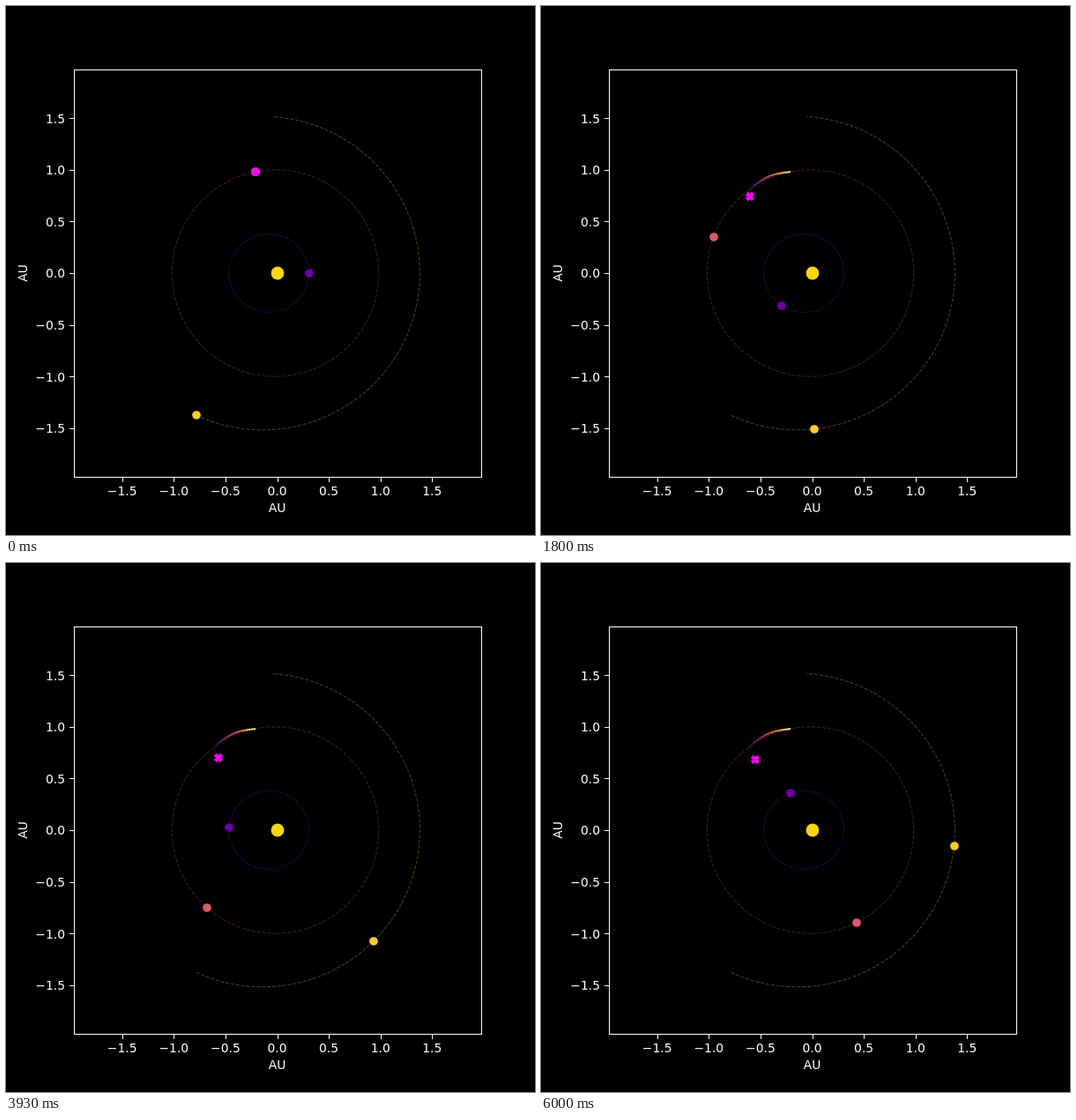
Animation, 600 px wide and 600 px high, one loop 6030 ms. Source, as an HTML page with a canvas:

```html
<!DOCTYPE html>
<html>
<head>
<meta charset="utf-8">
<style>
html, body { margin: 0; width: 100%; height: 100%; background: #000; overflow: hidden; }
canvas { display: block; }
</style>
</head>
<body>
<canvas id="stage" width="600" height="600"></canvas>
<script>
const ctx = document.getElementById('stage').getContext('2d');
const CX = 307.5, CY = 303, AU = 117.2, TAU = Math.PI * 2;
const STEP = 30, DAYS = 201;

// a in AU, period in days, m0 = mean anomaly in degrees on day 0
const planets = [
  { a: 0.3871, e: 0.2056, period: 87.97, m0: 0, color: '#6a00a8' },
  { a: 1, e: 0.0167, period: 365.25, m0: 100.1, color: '#da5a6a' },
  { a: 1.5237, e: 0.0934, period: 686.98, m0: 250, color: '#fcce25' }
];

// Probe path: distance travelled, x, y
const path = [
  [0, 283, 188], [18.3, 265, 191], [31.3, 253, 196], [47.8, 239.5, 205.5], [54, 236.6, 211],
  [58.9, 237.2, 216], [63.2, 240, 219.5], [64.8, 241.5, 220.8], [65.8, 242.3, 222.3], [67, 243.3, 223.5]
];
const heat = [[0, 0, 4], [62, 12, 108], [144, 40, 116], [222, 77, 81], [253, 162, 60], [252, 252, 175]];

function planetAt(p, day) {
  const m = p.m0 * TAU / 360 + TAU * day / p.period;
  let E = m;
  for (let i = 0; i < 6; i++) E -= (E - p.e * Math.sin(E) - m) / (1 - p.e * Math.cos(E));
  const x = p.a * (Math.cos(E) - p.e);
  const y = p.a * Math.sqrt(1 - p.e * p.e) * Math.sin(E);
  return [CX + x * AU, CY - y * AU];
}

const travelled = day => 61 * (1 - Math.exp(-day / 22)) + 0.03 * day;

function probeAt(day) {
  const s = Math.min(travelled(day), 67);
  let i = 0;
  while (i < path.length - 2 && s > path[i + 1][0]) i++;
  const p = path[i], q = path[i + 1], len = q[0] - p[0], u = (s - p[0]) / len;
  const slope = (j, k) => {
    const b = path[Math.max(j - 1, 0)], c = path[Math.min(j + 1, path.length - 1)];
    return (c[k] - b[k]) / (c[0] - b[0]);
  };
  return [1, 2].map(k => {
    const h = u * u * (3 - 2 * u);
    return p[k] + (q[k] - p[k]) * h
      + len * (slope(i, k) * u * (1 - u) ** 2 - slope(i + 1, k) * u * u * (1 - u));
  });
}

function heatColor(v) {
  const f = Math.max(0, Math.min(1, v)) * (heat.length - 1);
  const i = Math.min(Math.floor(f), heat.length - 2);
  return `rgb(${heat[i].map((c, k) => Math.round(c + (heat[i + 1][k] - c) * (f - i)))})`;
}

function line(points) {
  ctx.beginPath();
  points.forEach(p => ctx.lineTo(p[0], p[1]));
  ctx.stroke();
}

function dot([x, y], r, color) {
  ctx.fillStyle = color;
  ctx.beginPath();
  ctx.arc(Math.round(x), Math.round(y), r, 0, TAU);
  ctx.fill();
}

function cross([x, y]) {
  const r = 4.17, h = r / 2;
  ctx.save();
  ctx.translate(Math.round(x), Math.round(y));
  ctx.fillStyle = ctx.strokeStyle = '#f0f';
  ctx.lineWidth = 1.39;
  ctx.beginPath();
  for (let i = 0; i < 4; i++) {
    const c = [1, 0, -1, 0][i], s = [0, 1, 0, -1][i];
    for (const [a, b] of [[h, 0], [r, h], [h, r]]) ctx.lineTo(a * c - b * s, a * s + b * c);
  }
  ctx.closePath();
  ctx.fill();
  ctx.stroke();
  ctx.restore();
}

function drawAxes() {
  ctx.strokeStyle = ctx.fillStyle = '#fff';
  ctx.lineWidth = 1;
  ctx.strokeRect(77.5, 72.5, 462, 462);
  ctx.font = '13.89px "DejaVu Sans", sans-serif';
  for (let v = -1.5; v <= 1.5; v += 0.5) {
    const label = v.toFixed(1).replace('-', '\u2212');
    const x = Math.round(CX + v * AU) + 0.5, y = Math.round(CY - v * AU) + 0.5;
    line([[x, 535], [x, 540]]);
    line([[72, y], [77, y]]);
    ctx.textAlign = 'center';
    ctx.fillText(label, CX + v * AU, 555);
    ctx.textAlign = 'right';
    ctx.fillText(label, 67, CY - v * AU + 5.3);
  }
  ctx.textAlign = 'center';
  ctx.fillText('AU', CX, 574);
  ctx.save();
  ctx.translate(24, CY);
  ctx.rotate(-Math.PI / 2);
  ctx.fillText('AU', 0, 0);
  ctx.restore();
}

function drawOrbits() {
  ctx.save();
  ctx.globalAlpha = 0.3;
  ctx.lineWidth = 1.1;
  ctx.setLineDash([4.1, 1.8]);
  for (const p of planets) {
    ctx.strokeStyle = p.color;
    line(Array.from({ length: 366 }, (_, day) => planetAt(p, day)));
  }
  ctx.restore();
}

function drawTrail(day) {
  ctx.lineWidth = 2;
  for (let i = 0; i < day; i++) {
    ctx.strokeStyle = heatColor(1 - travelled(i + 0.5) / 61);
    line([probeAt(i), probeAt(i + 1)]);
  }
}

function draw(now) {
  const day = Math.floor(now / STEP) % DAYS;
  ctx.fillStyle = '#000';
  ctx.fillRect(0, 0, 600, 600);
  drawOrbits();
  drawTrail(day);
  drawAxes();
  dot([CX, CY], 7.4, '#ffd700');
  for (const p of planets) dot(planetAt(p, day), 4.85, p.color);
  cross(probeAt(day));
}

let start;
function tick(now) {
  start ??= now;
  draw(now - start);
  requestAnimationFrame(tick);
}
draw(0);
requestAnimationFrame(tick);
</script>
</body>
</html>
```
